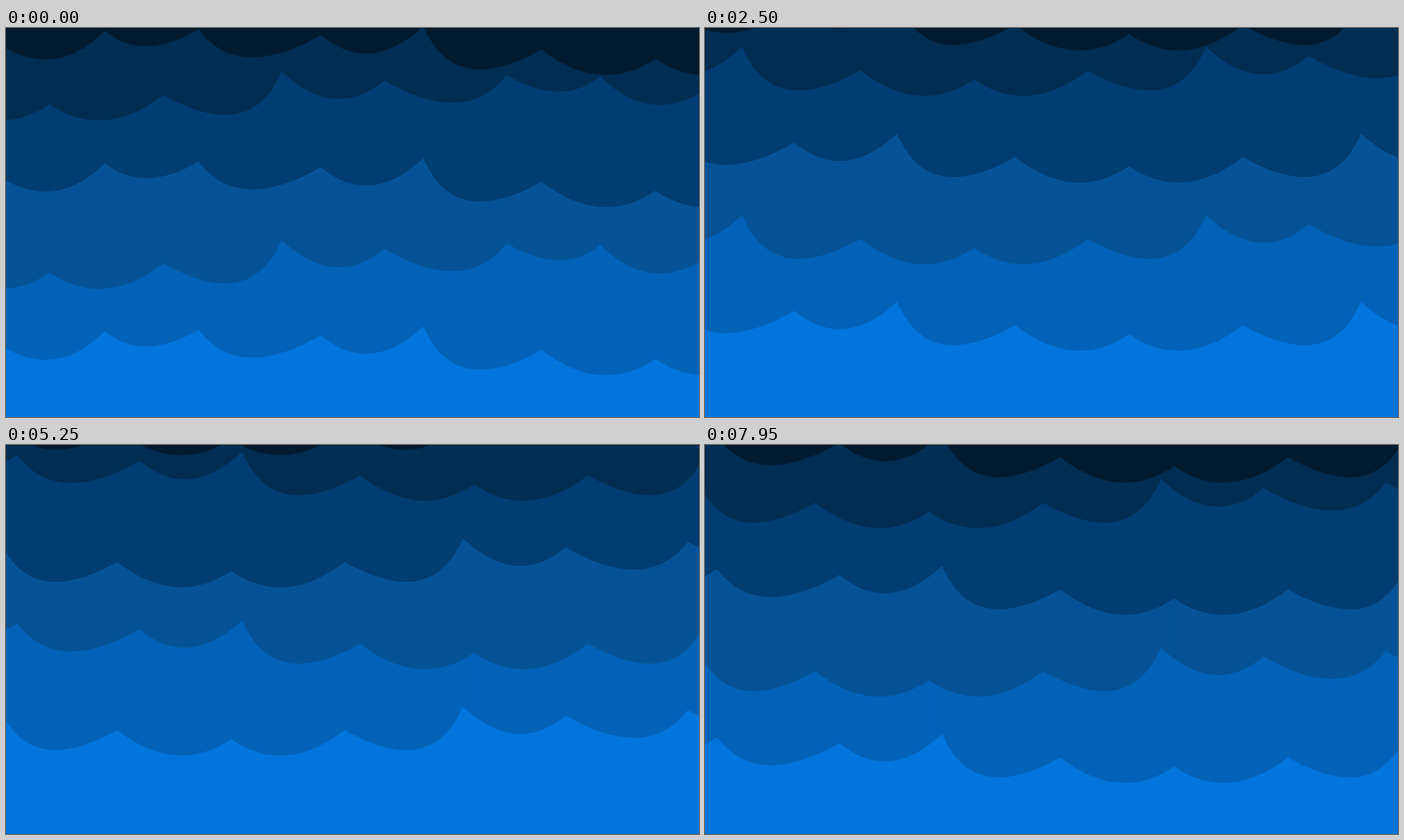
These frames come from a looping animation (998x561 px, 8 s). An HTML page with a canvas:

```html
<!DOCTYPE html>
<html lang="en">
<head>
<meta charset="utf-8">
<title>Waves</title>
<style>
  html, body { margin: 0; width: 100%; height: 100%; overflow: hidden; background: #001b30; }
  canvas { display: block; width: 100%; height: 100%; }
</style>
</head>
<body>
<canvas id="sea" width="998" height="561"></canvas>
<script>
const W = 998, H = 561;
const FPS = 24, FRAMES = 192;
const TURN = 119.5; // frame at which the drift runs backwards
const ctx = document.getElementById('sea').getContext('2d');

// Back to front; even layers drift left, odd ones mirror them.
const layers = [
  { color: '#002d52', dy: -433 },
  { color: '#003d72', dy: -367.5 },
  { color: '#055396', dy: -242.5 },
  { color: '#0262b8', dy: -124.5 },
  { color: '#0175db', dy: 0 }
];

// One half of the wave, outwards from its lowest crest: a curve per trough.
const half = new Path2D(`M-1 1100 V1 L0 0
  Q78 53 164 -13 Q290 58 334 -47 Q411 25 482 -34
  Q600 34 658 -42 Q738 5 793 -40 Q872 40 965 -35
  H1100 V1100 Z`);

// Highs and lows of the swell as [frame, height], joined by cosine easing.
const swell = [[-12, 482], [11, 385], [32, 481], [57, 391], [79.5, 478.5], [108, 361], [130, 495]];

function swellAt(n) {
  const i = swell.findIndex(p => p[0] > n);
  const [n0, y0] = swell[i - 1], [n1, y1] = swell[i];
  return y0 + (y1 - y0) * (1 - Math.cos(Math.PI * (n - n0) / (n1 - n0))) / 2;
}

function drawWave(x, y, color) {
  ctx.fillStyle = color;
  for (const side of [-1, 1]) {
    ctx.setTransform(side, 0, 0, 1, x, y);
    ctx.fill(half);
  }
  ctx.resetTransform();
}

function draw(ms) {
  // The clock runs a few ms ahead because frame times are rounded down.
  const frame = Math.floor((ms + 9) * FPS / 1000) % FRAMES;
  const n = frame < TURN ? frame : 2 * TURN - frame;
  const x = 935.2 - 5.41 * n;
  const y = swellAt(n) + 47;

  ctx.fillStyle = '#001b30';
  ctx.fillRect(0, 0, W, H);
  layers.forEach(({ color, dy }, i) => drawWave(i % 2 ? W - x : x, y + dy, color));
}

const start = performance.now();
function tick() {
  draw((performance.now() - start) % (FRAMES * 1000 / FPS));
  requestAnimationFrame(tick);
}
tick();
</script>
</body>
</html>
```
